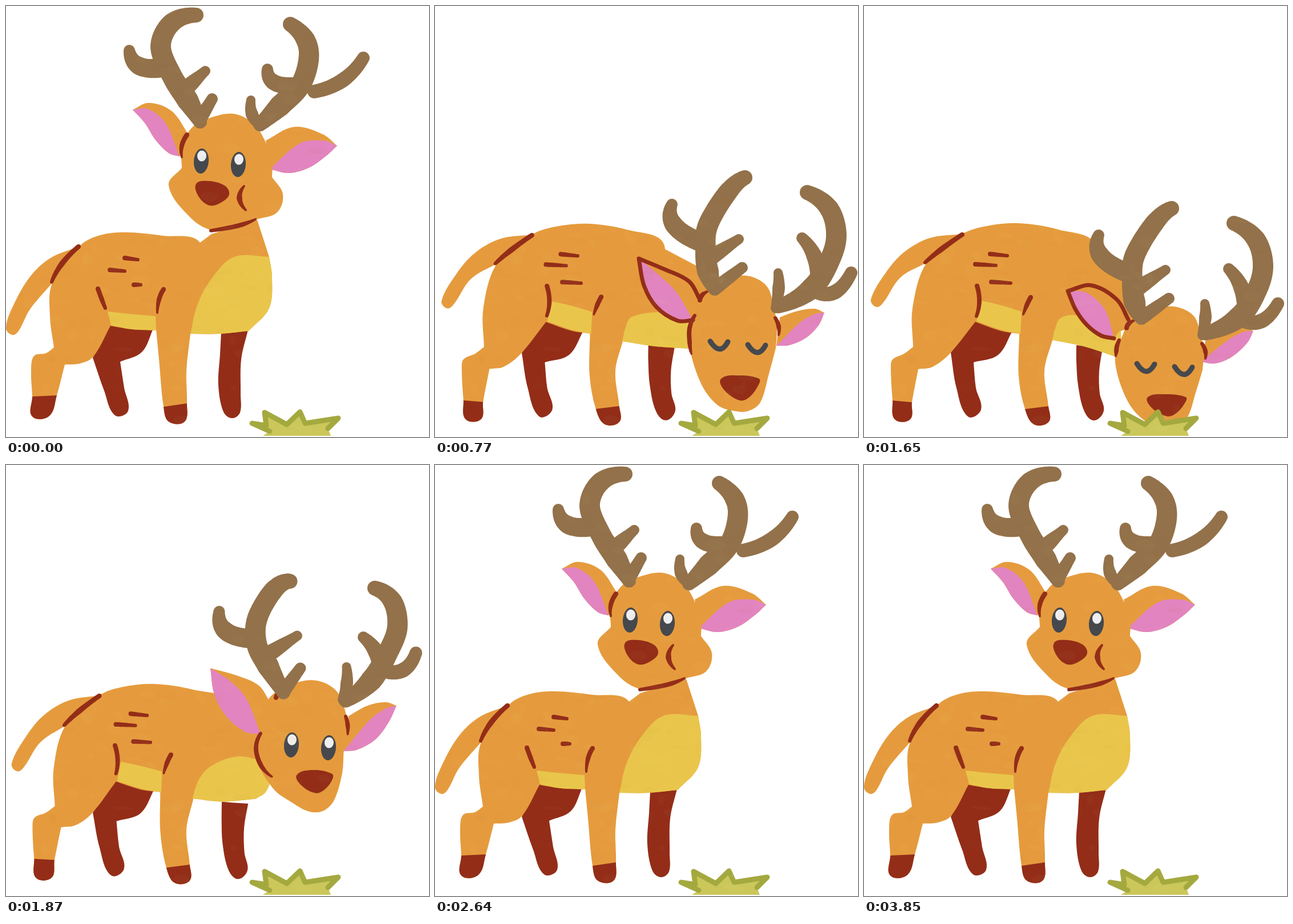
Animation of 741 by 756 pixels, one loop 3960 ms. Source, as an HTML page with a canvas:

```html
<!DOCTYPE html>
<html lang="en">
<head>
<meta charset="utf-8">
<title>Grazing deer</title>
<style>
html, body { margin: 0; height: 100%; overflow: hidden; background: #fff; }
canvas { display: block; }
</style>
</head>
<body>
<canvas id="stage" width="741" height="756"></canvas>
<script>
const ctx = document.getElementById('stage').getContext('2d');
const ORANGE = '#e59b3d', BROWN = '#932d18', ANTLER = '#93714a', PINK = '#e284c0',
  YELLOW = '#e9c64b', EYE = '#45484d', SHINE = '#efefef';

const parse = text => text.split(' ').map(p => p.split(',').map(Number));
const mix = (a, b, f) => a + (b - a) * f;
const mixPoint = (p, q, f) => p.map((v, k) => mix(v, q[k], f));

// Five poses: look left, look right, lower the head, sniff, graze.
// Two entries are the ends of the crouch. With four, grazing is the sniff sunk into the grass.
const sink = ([x, y]) => [x - 4, y + 54 - 0.12 * Math.max(0, y - 473)];
function part(...texts) {
  const poses = texts.map(parse);
  if (poses.length === 4) poses.push(poses[3].map(sink));
  return poses;
}

const CROUCH = [0, 0.35, 0.67, 0.95, 1];

function crouch(at) {
  const i = Math.min(3, Math.floor(at));
  return mix(CROUCH[i], CROUCH[i + 1], at - i);
}

function blend(poses, at) {
  const position = poses.length === 2 ? crouch(at) : at;
  const i = Math.min(poses.length - 2, Math.floor(position));
  return poses[i].map((p, k) => mixPoint(p, poses[i + 1][k], position - i));
}

const torso = part(
  '81,486 130,420 165,402 210,397 275,403 340,415 350,500 323,575 316,640 317,697 313,729 285,729 276,703 268,620 263,568 220,567 183,561 153,615 130,627 103,629 89,683 76,719 46,720 46,685 44,640 49,614 70,609 84,599 77,545',
  '110,450 172,400 215,386 270,381 340,392 405,420 370,500 330,586 316,640 323,702 324,729 298,734 282,707 271,650 272,575 240,570 195,554 150,610 120,633 95,637 84,695 81,725 54,725 50,692 47,635 50,620 70,610 86,598 85,530');
const torsoCorners = [7, 14, 16, 19, 27], hooves = [9, 20];

const tail = part(
  '130,421 78,442 42,475 12,527 0,565 11,577 22,570 42,532 80,487',
  '172,400 115,407 70,432 38,468 12,515 22,528 34,520 64,476 110,450');
const farHindLeg = part(
  '180,558 258,566 238,607 200,624 207,670 214,710 191,718 172,675 152,617',
  '192,552 260,570 235,612 192,625 196,670 205,708 182,720 162,670 152,608');
const farFrontLeg = part(
  '377,572 424,568 412,620 411,680 410,713 396,723 381,712 372,665 375,610',
  '372,595 418,600 412,640 413,680 420,710 403,727 386,711 375,665 372,622');
const belly = part(
  '178,536 215,540 262,544 263,569 220,567 184,560',
  '207,517 240,525 276,536 274,575 240,568 197,553');

// Points 0 to 8 bound the neck; from 3 on they bound the yellow chest.
const neck = part(
  '340,415 360,400 440,375 461,440 466,475 461,530 425,570 375,575 323,575 335,525 360,478 400,440',
  '350,414 395,385 462,425 465,470 468,500 458,548 432,570 380,583 328,579 340,540 365,495 415,460',
  '355,413 430,392 484,480 478,507 474,530 457,556 430,570 375,584 325,582 340,545 375,510 425,485',
  '400,425 470,462 480,540 455,545 455,570 452,592 445,601 385,597 328,588 335,560 345,545 395,537',
  '405,420 475,490 480,560 450,570 450,595 447,608 440,615 385,597 330,586 335,565 345,547 375,543');

const head = part(
  '327,212 355,197 398,189 432,205 453,235 466,275 466,300 485,330 475,362 440,374 400,387 360,393 322,370 285,315 308,284 308,245',
  '403,249 435,228 480,218 522,234 543,262 549,295 543,338 554,375 538,408 518,433 490,435 450,420 395,388 379,340 394,307 389,270',
  '460,311 492,291 532,282 570,295 592,325 597,365 586,408 593,435 580,480 562,503 535,505 510,486 470,474 428,430 438,395 438,345',
  '468,500 500,482 545,473 580,490 593,525 599,565 597,600 585,645 570,695 550,710 528,711 495,700 465,660 444,585 452,545 460,522');

// Tip, upper edge, base, lower edge.
const leftEar = part(
  '222,182 250,170 290,184 320,226 304,264 285,258 262,235 243,205',
  '303,228 345,224 380,240 405,250 387,306 360,298 330,275 310,248',
  '359,270 410,278 440,290 460,314 440,393 415,385 385,355 364,315',
  '357,443 400,461 445,483 464,515 452,551 425,552 388,528 366,490',
  '357,500 398,490 443,515 463,550 438,583 415,578 390,559 371,533');
const rightEar = part(
  '580,245 555,225 505,212 455,236 462,286 495,293 530,284 562,262',
  '634,266 615,253 585,258 550,268 545,340 570,332 605,308 625,285',
  '686,306 665,301 630,310 596,335 584,408 610,404 645,380 670,340',
  '682,538 665,531 635,535 604,546 598,596 620,595 650,582 672,560',
  '682,570 665,563 635,565 600,580 590,624 615,627 645,615 672,590');

const nose = part(
  '333,312 355,307 383,315 391,330 378,344 357,350 338,335',
  '468,355 495,346 527,355 528,362 515,376 500,383 478,373',
  '518,433 545,422 575,430 576,440 565,453 550,459 528,450',
  '501,654 535,648 568,654 567,664 552,685 535,692 508,675');

const eyes = part('342,272 407,278', '449,308 517,315', '502,386 566,390', '498,596 564,602');

// Limbs are tapered strokes: radii first, then the centre line in each pose.
const limb = (radii, ...poses) => ({ radii, poses: part(...poses) });

const BEAM = [13, 17, 18, 18, 19, 12];
const antlers = [
  limb(BEAM, '333,16 290,30 271,72 292,125 318,165 340,203', '414,40 380,65 363,105 370,155 395,195 418,235', '452,107 425,112 402,155 405,200 440,240 482,302', '543,301 512,328 478,385 474,430 478,465 490,496'),
  limb([10, 16, 17], '216,78 233,105 275,108', '295,131 325,152 370,148', '332,166 350,198 395,197', '415,348 418,383 460,412'),
  limb([9, 14], '349,114 318,142', '433,137 380,165', '488,190 440,220', '532,409 485,440'),
  limb([10, 12], '361,163 340,198', '443,189 420,230', '493,254 482,295', '538,459 495,492'),
  limb(BEAM, '498,32 525,60 530,95 515,140 480,175 445,208', '565,64 593,90 595,125 588,170 565,205 538,241', '640,105 665,125 668,170 645,215 620,260 588,300', '652,327 690,355 703,400 692,445 660,495 602,527'),
  limb([11, 13, 12], '626,91 590,130 540,150', '654,149 630,180 590,178', '707,191 690,218 650,220', '729,468 700,502 665,500'),
  limb([10, 14, 15], '458,111 468,133 500,140', '553,143 563,168 585,175', '609,197 630,213 640,230', '643,407 665,440 672,480'),
  limb([8, 11, 9], '429,165 431,190 445,208', '531,202 535,225 540,240', '592,240 592,270 583,293', '601,468 602,495 597,530')
];

const marks = [
  // rump, flecks, thigh and shoulder
  limb([3, 5, 4], '80,484 98,452 127,422', '107,450 135,427 172,401'),
  limb([4, 3], '208,442 231,445', '221,435 251,438'),
  limb([4, 3], '182,463 208,465', '195,453 231,455'),
  limb([4, 3], '224,489 236,489', '223,484 257,486'),
  limb([4, 4, 3], '161,496 168,515 174,530', '198,491 202,518 197,544'),
  limb([4, 4, 2], '276,497 268,515 265,538', '292,511 285,525 279,541'),
  // neck
  limb([3, 4, 4, 2], '359,394 390,389 415,383 437,374', '393,388 410,404 440,415 462,426', '437,399 430,430 447,463 482,483', '455,543 446,565 446,590 449,610', '447,586 443,597 442,605 441,614'),
  // mouth, tucked under the nose when the head is down
  limb([2, 5, 2], '417,316 409,337 420,358', '440,346 450,367 441,389', '548,442 548,442 548,442', '535,665 535,665 535,665'),
  // temples, tucked under an antler on the hidden side
  limb([4, 4, 2], '317,226 308,245 308,265', '418,235 418,235 418,235', '482,300 482,300 482,300', '464,516 468,507 477,501'),
  limb([3, 4, 2], '445,208 445,208 445,208', '542,259 549,280 547,304', '594,335 595,350 595,367', '596,547 602,562 602,577')
];

const grass = parse('462,746 431,732 456,736 453,713 492,734 515,712 524,732 582,723 564,741');

// Smooth path through the points, sharp at the corners.
function curve(points, corners = [], from = 0, count = points.length) {
  const n = points.length, path = new Path2D();
  const get = i => points[(i + n) % n];
  const handle = (i, j) => {
    const p = get(i), q = get(j), sharp = corners.includes((i + n) % n);
    const before = sharp ? p : get(2 * i - j);
    const dx = q[0] - before[0], dy = q[1] - before[1];
    const k = Math.hypot(q[0] - p[0], q[1] - p[1]) / 3 / (Math.hypot(dx, dy) || 1);
    return [p[0] + dx * k, p[1] + dy * k];
  };
  path.moveTo(...get(from));
  for (let i = from; i < from + count; i++)
    path.bezierCurveTo(...handle(i, i + 1), ...handle(i + 1, i), ...get(i + 1));
  return path;
}

function fill(path, color) {
  ctx.fillStyle = color;
  ctx.fill(path);
}

function stroke(path, color, width) {
  ctx.strokeStyle = color;
  ctx.lineWidth = width;
  ctx.stroke(path);
}

const spline = (a, b, c, d, t) =>
  b + t / 2 * (c - a + t * (2 * a - 5 * b + 4 * c - d + t * (3 * (b - c) + d - a)));

// The point before a, continuing the bend of a, b, c.
const extend = (a, b, c = b) => a.map((v, k) => 3 * (v - b[k]) + c[k]);

function drawLimb({ radii, poses }, at, color) {
  const line = blend(poses, at), back = [...line].reverse(), path = new Path2D();
  const points = [extend(...line), ...line, extend(...back)];
  for (let i = 0; i < line.length - 1; i++) {
    const [a, b, c, d] = points.slice(i, i + 4);
    for (let t = 0; t <= 1; t += 1 / 32) {
      const [x, y] = [0, 1].map(k => spline(a[k], b[k], c[k], d[k], t));
      const r = mix(radii[i], radii[i + 1], t);
      path.moveTo(x + r, y);
      path.arc(x, y, r, 0, 7);
    }
  }
  fill(path, color);
}

function drawEar(ear) {
  const [tip, upper1, upper2, , ...lower] = ear;
  const inner = [mixPoint(upper1, lower[3], 0.3), mixPoint(upper2, lower[2], 0.4)];
  fill(curve(ear, [0, 3, 4]), ORANGE);
  fill(curve([tip, ...inner, ...lower], [0, 3]), PINK);
}

function ellipse(x, y, rx, ry, color) {
  const path = new Path2D();
  path.ellipse(x, y, rx, ry, 0.08, 0, 7);
  fill(path, color);
}

function drawEye([x, y], closed) {
  if (closed) {
    const lid = new Path2D(`M${x - 16},${y - 8}q17,27 31,1`);
    return stroke(lid, EYE, 9);
  }
  ellipse(x, y, 13, 22, EYE);
  ellipse(x + 1, y - 9, 8, 9.5, SHINE);
}

function drawGrass() {
  const edge = new Path2D('M' + grass.join('L'));
  const blade = new Path2D(edge);
  blade.lineTo(569, 754);
  blade.lineTo(450, 754);
  fill(blade, '#cbc75a');
  stroke(edge, '#a4a93f', 9);
}

// Soft paper mottling, kept inside the painted shapes.
let seed = 7;
const random = () => (seed = seed * 16807 % 2147483647) / 2147483647;
const blots = Array.from({ length: 420 }, () =>
  [random() * 741, random() * 756, 3 + random() * 15, 2 + random() * 8,
    random() < 0.5 ? 'rgba(160,70,0,.022)' : 'rgba(255,235,190,.025)']);

function draw(at) {
  const shape = (poses, color, corners) => fill(curve(blend(poses, at), corners), color);
  const headDown = at > 2.5;
  ctx.clearRect(0, 0, 741, 756);
  ctx.lineCap = ctx.lineJoin = 'round';

  shape(farHindLeg, BROWN, [0, 1, 3, 8]);
  // the far front leg swings forward halfway through the crouch
  const swing = 9 * Math.sin(Math.PI * crouch(at));
  fill(curve(blend(farFrontLeg, at).map(([x, y]) => [x + swing, y]), [0, 1]), BROWN);
  shape(tail, ORANGE, [0, 8]);

  const trunk = blend(torso, at), throat = blend(neck, at);
  fill(curve(trunk, torsoCorners), ORANGE);
  for (const hoof of hooves) fill(curve(trunk, torsoCorners, hoof, 3), BROWN);
  fill(curve(throat.slice(0, 9), [0, 1, 2, 3, 6, 8]), ORANGE);
  shape(belly, YELLOW, [0, 2, 3, 5]);
  fill(curve(throat.slice(3), [0, 3, 5]), YELLOW);

  const ear = blend(leftEar, at);
  drawEar(ear);
  drawEar(blend(rightEar, at));
  shape(head, ORANGE, [6, 14]);
  if (headDown) stroke(curve([...ear.slice(4), ...ear.slice(0, 4)], [0, 4, 7], 0, 7), BROWN, 7);
  for (const mark of marks) drawLimb(mark, at, BROWN);
  shape(nose, BROWN);
  for (const antler of antlers) drawLimb(antler, at, ANTLER);
  for (const eye of blend(eyes, at)) drawEye(eye, headDown);
  drawGrass();

  ctx.globalCompositeOperation = 'source-atop';
  for (const blot of blots) ellipse(...blot);
  ctx.globalCompositeOperation = 'source-over';
}

const STEP = 110, STEPS = 36;
const lower = [0, 0.55, 1, 1.5, 2, 2, 2.5, 3], raise = [3, 2.5, 2, 1, 0.55];
const poseAt = step => lower[step] ?? (step < 16 ? 4 : raise[step - 16] ?? 0);

let shown;
function tick(now) {
  const at = poseAt(Math.floor(now / STEP) % STEPS);
  if (at !== shown) draw(shown = at);
  requestAnimationFrame(tick);
}
tick(performance.now());
</script>
</body>
</html>
```
